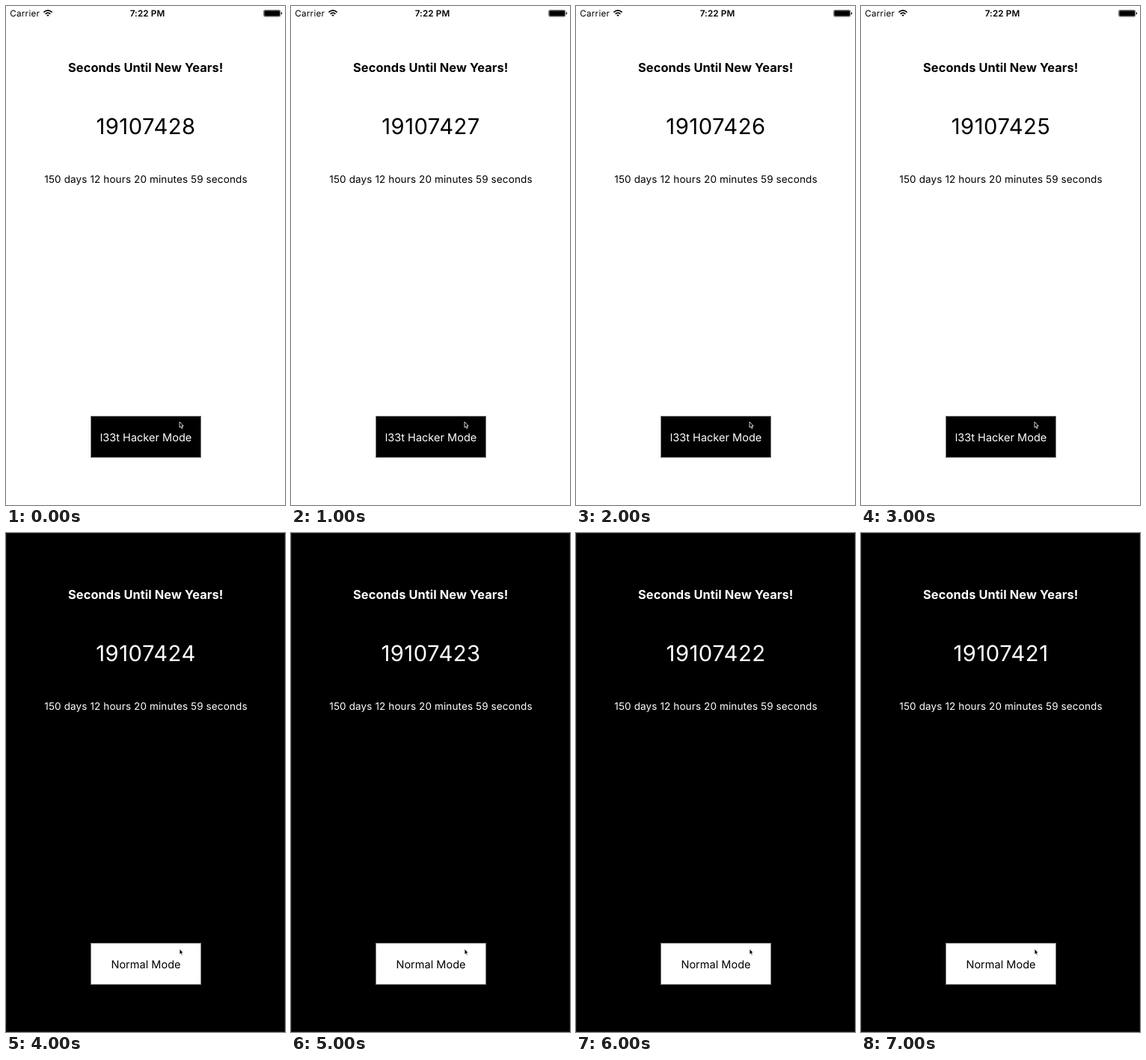
Recreate the animation shown at these times as an HTML page. Size 373 px wide and 666 px high, loop 8 s.

```html
<!DOCTYPE html>
<html lang="en">
<head>
<meta charset="utf-8">
<title>Countdown</title>
<style>
  html, body { margin: 0; width: 100%; height: 100%; overflow: hidden; background: #fff; }
  svg {
    --bg: #fff; --fg: #000; --edge: #fff;
    display: block; width: 373px; height: 666px; background: var(--bg);
    font-family: Inter, sans-serif; font-optical-sizing: none;
    text-rendering: geometricPrecision;
  }
  svg.dark { --bg: #000; --fg: #fff; --edge: #161616; }
  text { fill: var(--fg); text-anchor: middle; white-space: pre; }
  .status text { fill: #000; font-size: 11.7px; }
  .status .carrier { text-anchor: start; letter-spacing: .25px; }
  .status .clock { font-weight: 600; letter-spacing: .12px; }
  .dark .status { display: none; }
  .title { font-size: 16.4px; font-weight: 700; letter-spacing: .07px; }
  .count { font-size: 29.2px; letter-spacing: .5px; }
  .detail { font-size: 13.5px; letter-spacing: .12px; }
  .button rect { fill: var(--fg); stroke: #7c7c7c; }
  .button text { fill: var(--bg); font-size: 14.5px; letter-spacing: .02px; }
  .cursor { fill: #000; stroke: #fff; stroke-width: .8; stroke-linejoin: round; }
  .frame { fill: none; stroke: var(--edge); }
</style>
</head>
<body>
<svg id="stage" viewBox="0 0 373 666">
  <rect class="frame" x=".5" y=".5" width="372" height="665"/>

  <g class="status">
    <text class="carrier" x="5.2" y="14">Carrier</text>
    <g fill="none" stroke="#000" stroke-width="1.7">
      <path d="M50.4 8.3Q56 3.3 61.6 8.3"/>
      <path d="M52.6 10.6Q56 7.7 59.4 10.6"/>
    </g>
    <path d="M54.2 12.1Q56 10.7 57.8 12.1L56 14Z"/>
    <text class="clock" x="189" y="14">7:22 PM</text>
    <rect x="344.5" y="5.5" width="22.4" height="8.6" rx="1.6" fill="#fff" stroke="#777"/>
    <rect x="345.3" y="6.2" width="20.8" height="7.2" rx=".8"/>
    <path d="M367.7 8.2Q369.2 8.6 369.2 9.8T367.7 11.4Z"/>
  </g>

  <text class="title" x="186.7" y="88">Seconds Until New Years!</text>
  <text class="count" id="count" x="187" y="170.7">19107428</text>
  <text class="detail" x="187" y="236">150 days 12 hours 20 minutes 59 seconds</text>

  <g class="button">
    <rect x="113.5" y="547.5" width="147" height="55"/>
    <text id="label" x="187" y="580.8">l33t Hacker Mode</text>
  </g>
  <path class="cursor" d="M232 555V562.6L233.7 561.1L234.9 563.8L236.2 563.2L235 560.6H237.2Z"/>
</svg>

<script>
  const LOOP = 8000, START = 19107428, SWITCH = 4;
  const get = id => document.getElementById(id);
  const stage = get('stage'), count = get('count'), label = get('label');
  let shown = -1;

  function draw() {
    const second = Math.floor(performance.now() % LOOP / 1000);
    if (second !== shown) {
      const dark = second >= SWITCH;
      count.textContent = START - second;
      label.textContent = dark ? 'Normal Mode' : 'l33t Hacker Mode';
      stage.classList.toggle('dark', dark);
      shown = second;
    }
    requestAnimationFrame(draw);
  }
  draw();
</script>
</body>
</html>
```
